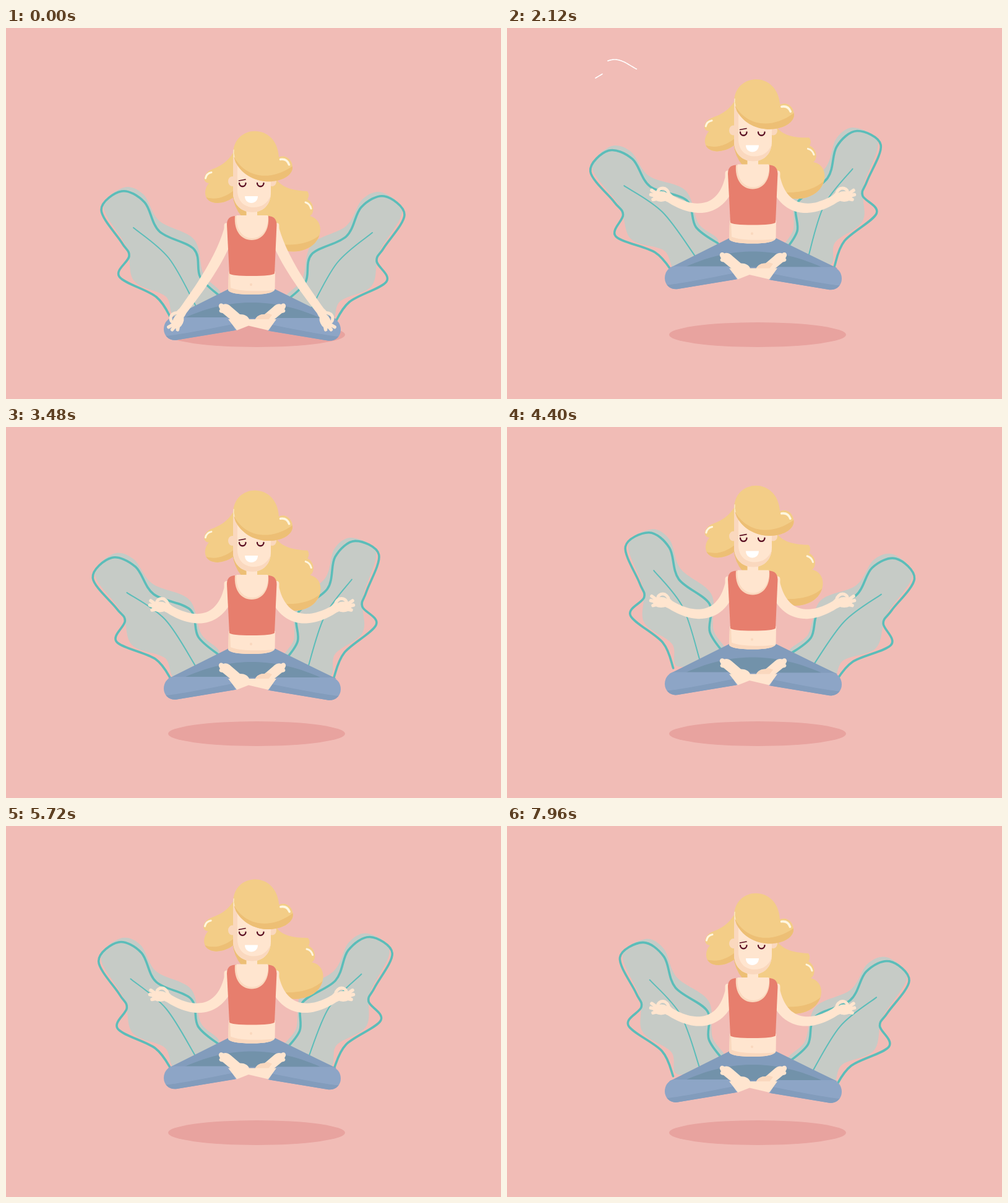
An HTML page with a canvas that plays this animation: 800 px wide and 600 px high, repeating every 8000 ms.

```html
<!DOCTYPE html>
<html lang="en">
<head>
<meta charset="utf-8">
<title>Floating meditation</title>
<style>
  html, body { margin: 0; width: 100%; height: 100%; overflow: hidden; background: #f1bcb6; }
  canvas { display: block; }
</style>
</head>
<body>
<canvas id="stage" width="800" height="600"></canvas>
<script>
const ctx = document.getElementById('stage').getContext('2d');
const LOOP = 8000;
const C = {
  bg: '#f1bcb6', ground: '#e8a39f', leaf: '#c6cbc6', line: '#5bbdb9',
  skin: '#ffe5cf', skinShade: '#fad8be', tee: '#e77e6d',
  hair: '#f3cd87', hairShade: '#edbf75', shine: '#fff6df',
  pants: '#8da5c6', thigh: '#829cbc', inner: '#7292aa', ink: '#5a0f22'
};

const clamp = x => Math.min(1, Math.max(0, x));
const mix = (a, b, u) => a + (b - a) * u;
const sway = u => (1 - Math.cos(Math.PI * clamp(u))) / 2;

// Soft start, long settling (cubic Bezier .33, 0, .2, 1)
function launch(u) {
  let lo = 0, hi = 1, s = 0.5;
  for (let i = 0; i < 20; i++) {
    s = (lo + hi) / 2;
    const x = 0.99 * s * (1 - s) ** 2 + 0.6 * s * s * (1 - s) + s ** 3;
    if (x < clamp(u)) lo = s; else hi = s;
  }
  return s * s * (3 - 2 * s);
}

// Value at time t between [time, value] poses
function track(poses, t) {
  const i = poses.findIndex(p => p[0] > t);
  if (i === 0) return poses[0][1];
  if (i < 0) return poses[poses.length - 1][1];
  const [t0, v0] = poses[i - 1], [t1, v1] = poses[i];
  return mix(v0, v1, sway((t - t0) / (t1 - t0)));
}

const TOP = -92, RISE = 1250;
const hoverPoses = [[RISE, TOP], [3450, -64], [5450, -80], [8200, -57.5]];
const leftSway = [[1200, 0], [2600, 9], [3000, 9], [4600, -12], [6500, 9], [6900, 9], [8400, -13]];
const rightSway = [[1000, 0], [2500, 14], [3200, 14], [4750, -7.5], [6350, 13], [7700, -2]];

// Smooth curve through a few points
function smooth(pts, closed) {
  const n = pts.length, path = new Path2D();
  const at = i => closed ? pts[(i + n) % n] : pts[Math.min(n - 1, Math.max(0, i))];
  path.moveTo(...pts[0]);
  for (let i = 0; i < (closed ? n : n - 1); i++) {
    const [a, b, c, d] = [at(i - 1), at(i), at(i + 1), at(i + 2)];
    path.bezierCurveTo(b[0] + (c[0] - a[0]) / 6, b[1] + (c[1] - a[1]) / 6,
      c[0] - (d[0] - b[0]) / 6, c[1] - (d[1] - b[1]) / 6, c[0], c[1]);
  }
  return path;
}

const asPath = d => typeof d === 'string' ? new Path2D(d) : d;
function fill(d, color) {
  ctx.fillStyle = color;
  ctx.fill(asPath(d));
}
function stroke(d, color, width) {
  ctx.strokeStyle = color;
  ctx.lineWidth = width;
  ctx.stroke(asPath(d));
}
function oval(x, y, rx, ry, color) {
  ctx.fillStyle = color;
  ctx.beginPath();
  ctx.ellipse(x, y, rx, ry, 0, 0, 7);
  ctx.fill();
}
function group(draw) {
  ctx.save();
  draw();
  ctx.restore();
}
function shaded(shape, color, shade, shadeColor) {
  fill(shape, color);
  group(() => { ctx.clip(asPath(shape)); fill(shade, shadeColor); });
}
function mirror(sum, draw, dy = 0) {
  group(() => { ctx.translate(sum, dy); ctx.scale(-1, 1); draw(); });
}
function tilt(x, y, angle, draw) {
  group(() => { ctx.translate(x, y); ctx.rotate(angle); ctx.translate(-x, -y); draw(); });
}

const leafEdge = [[346, 434], [314, 403], [304, 358], [248, 329], [224, 282], [187, 264],
  [154, 294], [187, 347], [199, 369], [183, 402], [243, 435], [268, 472]];
const leafBody = [[346, 434], [319, 398], [304, 342], [248, 312], [222, 269], [190, 258],
  [158, 290], [195, 355], [207, 409], [258, 434], [276, 468]];
const leafVein = [[206, 323], [263, 372], [307, 450]];

// Each point turns about the leaf's foot; the lower part moves slightly ahead
function leaf(poses, direction, t) {
  const bend = pts => pts.map(([px, py]) => {
    const x = px - 320, y = py - 470;
    const lead = 150 * (1 - clamp(Math.hypot(x, y) / 220));
    const a = direction * track(poses, t + lead) * Math.PI / 180;
    return [320 + x * Math.cos(a) - y * Math.sin(a), 470 + x * Math.sin(a) + y * Math.cos(a)];
  });
  fill(smooth(bend(leafBody), true), C.leaf);
  stroke(smooth(bend(leafEdge)), C.line, 3.6);
  stroke(smooth(bend(leafVein)), C.line, 2);
}

const leftHair = 'M370 196 C360 217 345 224 332 229 C320 234 315 249 328 251 C318 262 319 283 342 283 Q370 281 380 256 Z';
const leftHairShade = 'M318 272 Q345 284 374 258 V290 H318 Z';
const rightHair = 'M400 240 L437 245 C447 259 466 263 487 264 C490 268 490 273 487 277 C499 283 499 300 491 304 '
  + 'C511 309 513 333 499 348 C486 362 460 366 440 356 L396 306 Z';
const rightHairShade = 'M512 330 Q488 356 434 349 V370 H512 Z';
const fringe = 'M367 204 C367 155 438 152 441 209 C452 204 464 213 463 227 C460 252 395 262 371 217 Z';
const fringeShade = 'M366 203 C382 241 425 251 465 222 V256 H366 Z';

function backHair(lift) {
  tilt(370, 205, lift * 0.045, () => {
    shaded(leftHair, C.hair, leftHairShade, C.hairShade);
    stroke('M322.5 243 Q324 235 332 233.5', C.shine, 3);
  });
  tilt(425, 245, -lift * 0.09, () => {
    shaded(rightHair, C.hair, rightHairShade, C.hairShade);
    stroke('M484 282 Q491 284 493 292', C.shine, 3);
  });
  fill('M366 268 H397 V305 H381 Q368 290 366 268 Z', C.hairShade);
}

function legs() {
  fill('M360 422 L290 457 L262 471 L300 476 H500 L534 471 L505 457 L434 422 Z', C.thigh);
  fill('M288 469 C330 450 365 444 397 444 S466 450 508 469 Z', C.inner);
  const calf = 'M268 468 H358 L373 488.5 L275 504.7 C264 506 255 498 255 487 C255 478 260 471 268 468 Z';
  const calfShade = 'M252 498 Q262 500 366 479 L380 511 H252 Z';
  shaded(calf, C.pants, calfShade, C.thigh);
  mirror(796, () => shaded(calf, C.pants, calfShade, C.thigh), 1);
}

function feet() {
  const foot = 'M344 451 C343 446 348 444 351 447 C357 445 361 448 364 451 L378 463 C386 463 391 466 393 471 '
    + 'L373 480 L350 461 C345 461 343 457 346 455 Z';
  mirror(796, () => shaded(foot, C.skin, 'M366 464 Q380 456 396 472 L380 482 Z', C.skinShade));
  fill(foot, C.skin);
  fill('M359 471 H437 L424 489 L392 481.5 L373 489 Z', C.skin);
}

function arm(raise) {
  const xs = [364, mix(350, 352, raise), mix(310, 300, raise), mix(281, 257, raise)];
  const ys = [mix(318, 315, raise), mix(372, 385, raise), mix(425, 385, raise), mix(464, 354, raise)];
  const bez = ([a, b, c, d], s) => a * (1 - s) ** 3 + 3 * b * s * (1 - s) ** 2 + 3 * c * s * s * (1 - s) + d * s ** 3;
  const outer = [], inner = [];
  for (let s = 0; s <= 1; s += 1 / 16) {
    const x = bez(xs, s), y = bez(ys, s);
    const a = Math.atan2(bez(ys, s + 0.01) - bez(ys, s - 0.01), bez(xs, s + 0.01) - bez(xs, s - 0.01));
    const w = mix(9.5, 6.5, s), dx = -Math.sin(a) * w, dy = Math.cos(a) * w;
    outer.push([x + dx, y + dy]);
    inner.unshift([x - dx, y - dy]);
  }
  fill(smooth([...outer, ...inner], true), C.skin);
  tilt(0, 0, 0, () => {
    ctx.translate(mix(283, 261, raise), mix(463, 355, raise));
    ctx.rotate(mix(-1.15, 0, raise));
    oval(-12, 0, 13, 8.5, C.skin);
    stroke('M-16 -2 L-27 -10 M-17 0 L-28.5 -3 M-16 3 L-25 5', C.skin, 5.5);
    stroke('M-17 -4 C-19 -11 -12 -15 -6 -13 C-1 -10 1 -7 0 -2', C.skin, 5);
  });
}

function torso() {
  shaded('M360 394 H435 L434.5 423 Q430 431 397 431 Q363 431 359 424 Z', C.skin,
    'M358 394 H362 L363 420 Q380 428 436 424 V433 H358 Z', C.skinShade);
  oval(396, 415, 2, 2.2, C.skinShade);
  fill('M357 318 Q357 304 371 304 H423 Q437 304 437.5 318 L434 397 Q430 401 397 401 Q364 401 361 397 Z', C.tee);
  fill('M370 304 H424 C426 328 414 343 397 343 S368 328 370 304 Z', C.skinShade);
  fill('M372.5 303 H423 C425 325 413 340 398 340 S371 327 372.5 303 Z', C.skin);
  fill('M388.5 286 H406 V306 H388.5 Z', C.skin);
}

function head(lift) {
  oval(366, 248, 7, 8, C.skinShade);
  oval(430, 248, 7, 8, C.skinShade);
  shaded('M367 200 H428 V266 C428 286 415 298 398 298 S367 286 367 266 Z', C.skin,
    'M366 195 H374 V264 C375 283 388 290 400 290 C414 290 424 283 429 268 V300 H366 Z', C.skinShade);
  stroke('M377 251 A5 5 0 0 0 387.5 251 M406 251 A5 5 0 0 0 416.5 251', C.ink, 2.3);
  stroke('M376.5 247 L387 245', C.ink, 1.6);
  fill('M386 272 H407 C407 279 402 283 396.5 283 S386 279 386 272 Z', '#fff');
  tilt(370, 200, -lift * 0.05, () => {
    shaded(fringe, C.hair, fringeShade, C.hairShade);
    stroke('M443.5 212.5 Q454 211 457.5 221', C.shine, 3.6);
  });
  stroke('M368 197 Q367 203 369 209', C.shine, 1);
}

// A stretch of sine wave that draws itself in, then runs out
function breeze(left, right, y, crest, start, t) {
  const front = mix(left, right, sway((t - start) / 950));
  const back = mix(left, right, sway((t - start - 550) / 950));
  if (front - back < 0.3) return;
  const wave = new Path2D();
  const point = x => wave.lineTo(x, y - 10 * Math.cos((x - crest) * 2 * Math.PI / 104));
  for (let x = back; x < front; x += 2) point(x);
  point(front);
  stroke(wave, '#fff', 1.6);
}

function draw(t) {
  const hover = t < RISE ? TOP * launch(t / RISE) : track(hoverPoses, t);
  const lift = clamp((-hover - 62) / 27);
  const raise = launch(t / 1000);
  ctx.lineCap = ctx.lineJoin = 'round';
  ctx.fillStyle = C.bg;
  ctx.fillRect(0, 0, 800, 600);
  oval(405, 496, 143, 20, C.ground);
  breeze(163, 310, 61, 174, 1760, t);
  breeze(143, 350, 78, 174, 1980, t);
  breeze(350, 500, 536, 370, 6150, t);
  group(() => {
    ctx.translate(0, hover);
    leaf(leftSway, -1, t);
    mirror(798, () => leaf(rightSway, 1, t), 8);
    backHair(lift);
    legs();
    feet();
    arm(raise);
    mirror(794, () => arm(raise));
    torso();
    head(lift);
  });
}

function tick() {
  draw(performance.now() % LOOP);
  requestAnimationFrame(tick);
}
tick();
</script>
</body>
</html>
```
